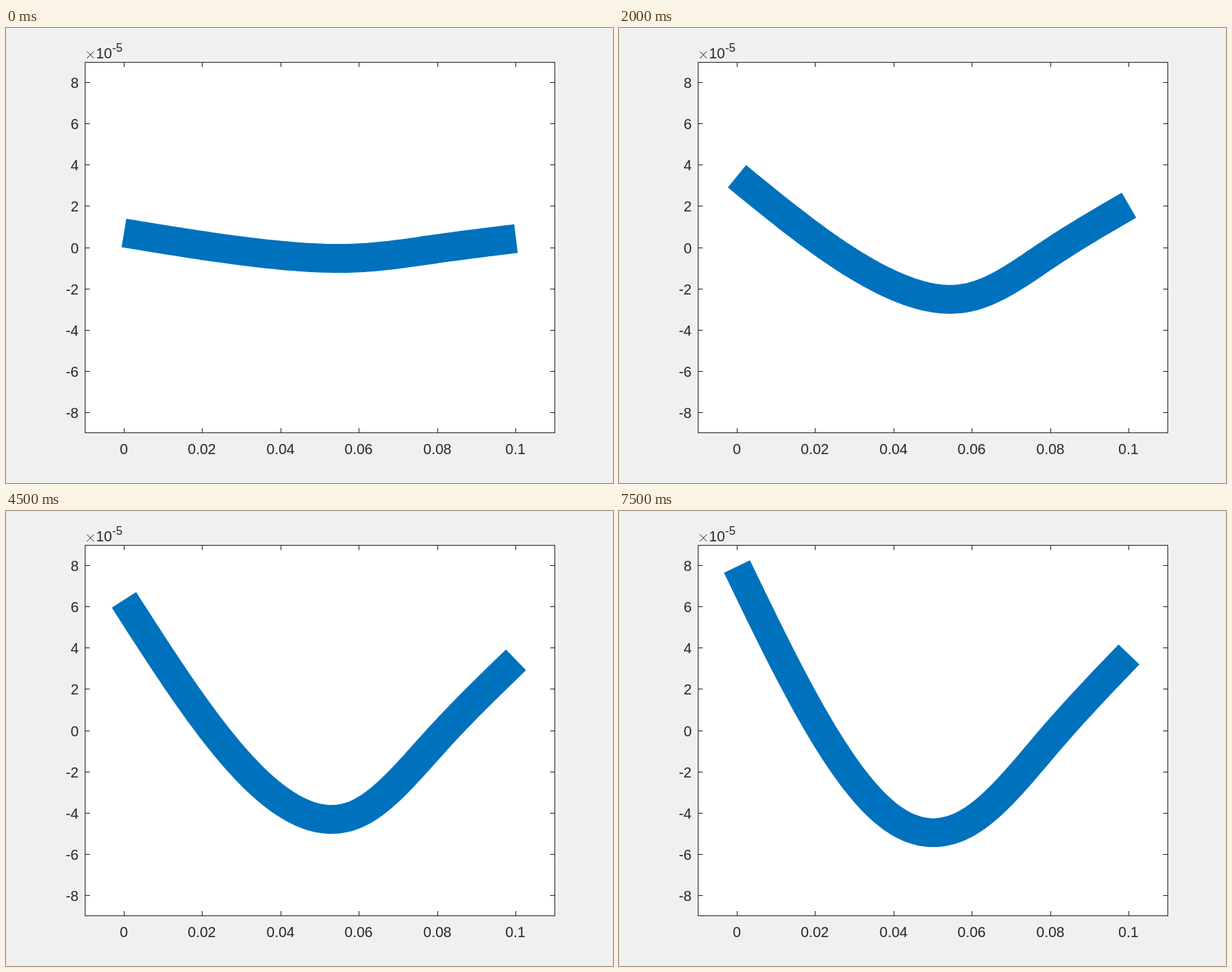
Write an HTML page that moves like this. It is 840 px wide and 630 px high and loops after 8 s.

```html
<!DOCTYPE html>
<html lang="en">
<head>
<meta charset="utf-8">
<title>Beam vibration</title>
<style>
  html, body { margin: 0; width: 100%; height: 100%; overflow: hidden; background: #f0f0f0; }
  svg { display: block; }
  text { font: 20px "Liberation Sans", Arial, sans-serif; fill: #262626; }
  path { fill: none; stroke: #262626; }
  #axes { shape-rendering: crispEdges; }
  #beam { stroke: #0072bd; stroke-width: 40; stroke-linejoin: round; }
</style>
</head>
<body>
<svg width="840" height="630" viewBox="0 0 840 630">
  <rect x="109" y="47" width="651" height="514" fill="#fff"/>
  <path id="axes"/>
  <path id="beam"/>
  <g id="labels"></g>
  <path d="M112 32.5l9.5 9.5m0 -9.5l-9.5 9.5"/>
  <text x="124.5" y="42">10</text>
  <text x="147" y="33" style="font-size:16px">-5</text>
</svg>
<script>
const STEP = 500, LOOP = 8000;
const LEFT = 163.25, GAP = 108.5, ZERO = 304;
const el = id => document.getElementById(id);

// Amplitudes in px of the slow and the twice as fast vibration, at x = 0, 0.02 ... 0.1
const modes = [[225, -16], [15.8, 6], [-121.5, 9.5], [-125.7, -5.8], [-12.3, -1.3], [107.2, 5.8]];

// Slopes of a natural cubic spline through evenly spaced values
function splineSlopes(y) {
  const last = y.length - 1, m = y.map(() => 0);
  for (let pass = 0; pass < 40; pass++) {
    for (let k = 0; k <= last; k++) {
      if (k === 0) m[k] = (3 * (y[1] - y[0]) - m[1]) / 2;
      else if (k === last) m[k] = (3 * (y[k] - y[k - 1]) - m[k - 1]) / 2;
      else m[k] = (3 * (y[k + 1] - y[k - 1]) - m[k - 1] - m[k + 1]) / 4;
    }
  }
  return m;
}

function beamPath(phase) {
  const y = modes.map(([slow, fast]) => slow * Math.sin(phase) + fast * Math.sin(2 * phase));
  const m = splineSlopes(y);
  const points = [];
  for (let i = 0; i <= 100; i++) {
    const s = i / 20, k = Math.min(Math.floor(s), 4), u = s - k, v = 1 - u;
    const h = y[k] * v * v * (1 + 2 * u) + y[k + 1] * u * u * (1 + 2 * v)
      + u * v * (m[k] * v - m[k + 1] * u);
    points.push(`${(LEFT + GAP * s).toFixed(2)} ${(ZERO - h).toFixed(2)}`);
  }
  return "M" + points.join("L");
}

function drawAxes() {
  let d = "M109.5 47.5H759.5V560.5H109.5Z", labels = "";
  for (let i = 0; i < 6; i++) {
    const x = Math.floor(LEFT + GAP * i);
    d += `M${x + .5} 47v7M${x + .5} 561v-7`;
    labels += `<text x="${x}" y="590" text-anchor="middle">${+(i * .02).toFixed(2)}</text>`;
  }
  for (let v = -8; v <= 8; v += 2) {
    const y = Math.floor(ZERO - v * 28.53);
    d += `M109 ${y + .5}h7M760 ${y + .5}h-7`;
    labels += `<text x="100.5" y="${y + 8}" text-anchor="end">${v}</text>`;
  }
  el("axes").setAttribute("d", d);
  el("labels").innerHTML = labels;
}

function draw() {
  const step = Math.floor(performance.now() % LOOP / STEP);
  el("beam").setAttribute("d", beamPath((step + 1) * Math.PI / 30));
  requestAnimationFrame(draw);
}

drawAxes();
draw();
</script>
</body>
</html>
```
